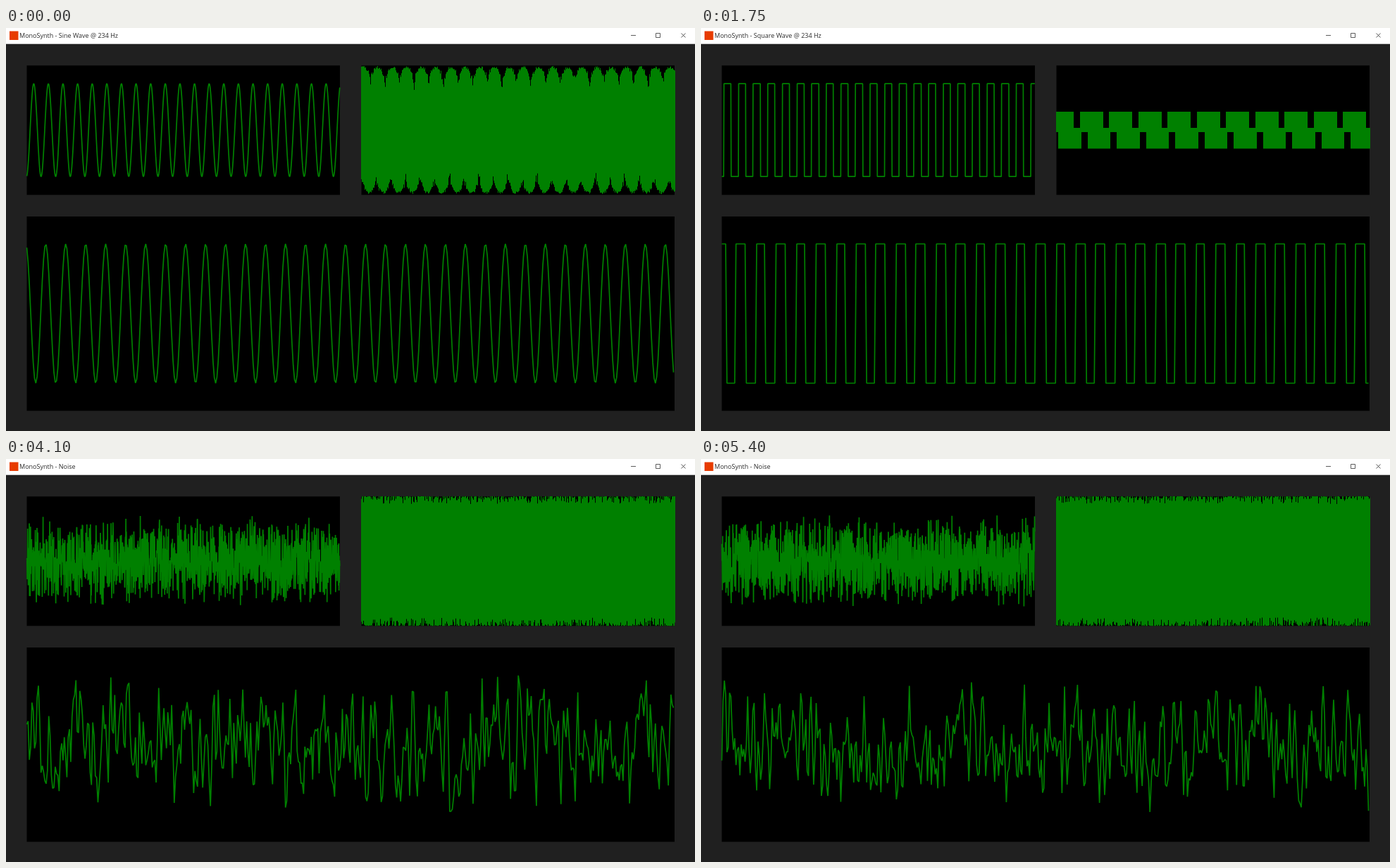
These frames come from a looping animation (978 px wide and 573 px high, 5.52 s). An HTML page:

```html
<!DOCTYPE html>
<html lang="en">
<head>
<meta charset="utf-8">
<title>MonoSynth</title>
<style>
  html, body { margin: 0; width: 100%; height: 100%; overflow: hidden; background: #202020; }
  svg { display: block; width: 978px; height: 573px; }
  text { font: 9px "Open Sans", "Noto Sans", sans-serif; fill: #2c2c2c; }
  .line { fill: none; stroke: #008000; stroke-width: 1.7; stroke-linejoin: bevel; }
  .icon { fill: none; stroke: #333; stroke-width: .8; }
</style>
</head>
<body>
<svg viewBox="0 0 978 573">
  <rect width="978" height="573" fill="#202020"/>
  <rect width="978" height="22.7" fill="#fff"/>
  <rect x="5" y="4.5" width="12.5" height="12.5" fill="#e73c00"/>
  <text id="title" x="19" y="14.2"></text>
  <path class="icon" d="M887 10.5h7M922.5 7.5h6v6h-6zM958.5 7.5l6 6m0-6l-6 6"/>
  <rect x="29.5" y="53.3" width="444.5" height="184"/>
  <rect x="504.5" y="53.3" width="444.5" height="184"/>
  <rect x="29.5" y="268" width="919.5" height="276.3"/>
  <path id="left" class="line"/>
  <path id="right" fill="#008000"/>
  <path id="bottom" class="line"/>
</svg>
<script>
const LOOP = 5520;
const PERIOD = 20.75;       // one cycle in the upper panels
const LONG_PERIOD = 28.37;  // one cycle in the lower panel
const $ = id => document.getElementById(id);
const mod = (a, n) => ((a % n) + n) % n;

// Runs of evenly spaced picture changes: first, last, count
const times = [0];
for (const [first, last, count] of [
  [20, 520, 5], [660, 1150, 5], [1270, 1750, 5], [1880, 2360, 5], [2480, 2480, 1], [2620, 3090, 5],
  [3220, 3220, 1], [3370, 3860, 5], [3980, 4470, 5], [4590, 5050, 5], [5170, 5400, 3]
]) for (let i = 0; i < count; i++) times.push(first + (last - first) * i / Math.max(1, count - 1));

function random(seed) {
  let s = seed * 7919 + 17;
  return () => {
    s = (s + 0x6D2B79F5) | 0;
    let r = Math.imul(s ^ (s >>> 15), 1 | s);
    r ^= r + Math.imul(r ^ (r >>> 7), 61 | r);
    return ((r ^ (r >>> 14)) >>> 0) / 4294967296;
  };
}

// Signed distance from x to the nearest of a row of centres
const toNearest = (x, centre, spacing) => mod(x - centre + spacing / 2, spacing) - spacing / 2;
const within = (x, start, length) => mod(x - start, 2 * PERIOD) < length;

function sineNotch(x, centre, rnd) {
  const d = Math.abs(toNearest(x, centre, PERIOD)) / PERIOD;
  const deep = Math.abs(toNearest(x, centre, 2 * PERIOD)) < PERIOD / 2;
  return 1 + rnd() * 4 + (deep ? 34 : 27) * (1 - 2 * d) ** 2.5 * (0.45 + 0.55 * rnd());
}

// wave: phase -> -1..1; ref and origin: step at which a cycle begins at x = origin
// top, bottom: edges of the filled band in the right panel
const waves = [
  { from: 0, title: "Sine Wave @ 234 Hz", ref: 0, origin: 34.2, drop: 0,
    wave: p => Math.sin(2 * Math.PI * p),
    top: (x, rnd) => 53 + sineNotch(x, 537.5, rnd),
    bottom: (x, rnd) => 237 - sineNotch(x, 546, rnd) },
  { from: 9, title: "Square Wave @ 234 Hz", ref: 11, origin: 44.7, drop: 0,
    wave: p => p < 0.5 ? 1 : -1,
    top: x => within(x, 508, 33) ? 119 : 142,
    bottom: x => within(x, 519, 32.5) ? 171.5 : 148 },
  { from: 17, title: "Sawtooth Wave @ 234 Hz", ref: 20, origin: 34, drop: 0,
    wave: p => 1 - 2 * p,
    top: x => {
      const v = mod(x - 519.5, PERIOD);
      return within(x, 519.5, PERIOD) ? 53 + v * 1.4 - (v > 13.5 ? 5 : 0) : 53 + v * 0.85 - (v > 16 ? 4 : 0);
    },
    bottom: x => {
      const v = mod(x - 541, PERIOD);
      return within(x, 541, PERIOD) ? 213 + v * 0.95 - (v > 16 ? 3 : 0) : 222 + v * 0.73;
    } },
  { from: 25, title: "Triangle Wave @ 234 Hz", ref: 27, origin: 47.6, drop: 0.4,
    wave: p => Math.abs(4 * p - 2) - 1,
    top: (x, rnd) => 53 + Math.max(rnd() ** 2 * 6, 9 - 1.3 * Math.abs(toNearest(x, 522, 2 * PERIOD))),
    bottom: (x, rnd) => {
      const peak = 24 * (1 - Math.abs(toNearest(x, 522.5, 2 * PERIOD)) / 9);
      const slot = Math.abs(toNearest(x, 543.3, 2 * PERIOD)) < 4 ? 20 : 0;
      return 237 - Math.max(peak, slot, rnd() ** 2 * 10);
    } },
  { from: 33, title: "Noise", ref: 34,
    top: (x, rnd) => 53 + rnd() ** 4 * 11,
    bottom: (x, rnd) => 237.3 - rnd() ** 4 * 12 }
];

// Polyline through count + 1 samples, value in -1..1
function trace(x, width, centre, amp, count, value) {
  let d = "";
  for (let i = 0; i <= count; i++) {
    const px = x + width * i / count;
    d += (i ? "L" : "M") + px.toFixed(2) + " " + (centre - amp * value(px)).toFixed(2);
  }
  return d;
}

function band(wave, shift, rnd) {
  let d = "M504 145";
  for (let x = 504; x < 950; x++) d += `V${wave.top(x - shift, rnd).toFixed(1)}H${x + 1}`;
  for (let x = 949; x >= 504; x--) d += `V${wave.bottom(x - shift, rnd).toFixed(1)}H${x}`;
  return d + "Z";
}

let shown = -1;
function draw(step) {
  if (step === shown) return;
  shown = step;
  const w = waves.findLast(v => step >= v.from);
  const rnd = random(step + 1);
  $("title").textContent = "MonoSynth - " + w.title;
  const shift = (step - w.ref) * 7.3;
  if (w.wave) {
    const sample = (origin, period) => x => w.wave(mod((x - origin) / period, 1)) - w.drop;
    $("left").setAttribute("d", trace(29.5, 444.3, 145.2, 66, 1000, sample(w.origin + shift, PERIOD)));
    // The lower trace is triggered: it always starts at the same phase
    const start = w.from === 25 ? 49.35 : 49.3;
    $("bottom").setAttribute("d", trace(29.5, 918, 406, 99, 500, sample(start, LONG_PERIOD)));
  } else {
    const noise = () => rnd() + rnd() - 1;
    $("left").setAttribute("d", trace(29.5, 444.3, 145.2, 66, 1500, noise));
    let last = rnd();
    const smooth = () => {
      const next = rnd(), mean = last + next - 1;
      last = next;
      return mean;
    };
    $("bottom").setAttribute("d", trace(29.5, 918, 406, 99, 500, smooth));
  }
  $("right").setAttribute("d", band(w, shift, rnd));
}

const begin = performance.now();
function tick() {
  const t = (performance.now() - begin) % LOOP;
  draw(times.findLastIndex(v => v <= t + 0.5));
  requestAnimationFrame(tick);
}
draw(0);
requestAnimationFrame(tick);
</script>
</body>
</html>
```
